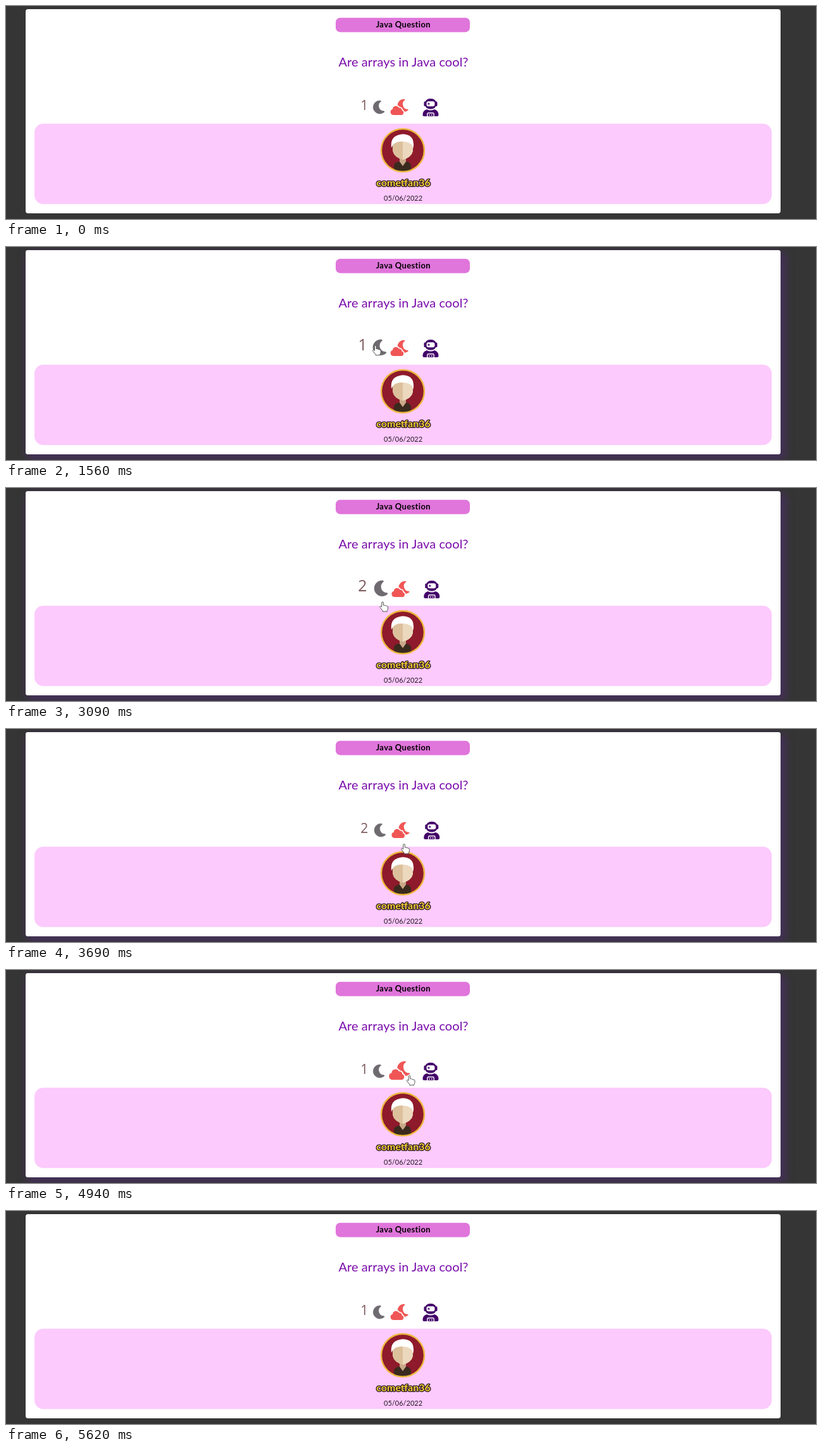
Recreate the animation shown at these times as an HTML page. Size 1280 by 338 pixels, loop 6.35 s.

```html
<!DOCTYPE html>
<html lang="en">
<head>
<meta charset="utf-8">
<title>Question card</title>
<style>
  html, body { margin: 0; width: 100%; height: 100%; overflow: hidden; background: #353535; }
  #stage { position: relative; width: 1280px; height: 338px; overflow: hidden; }
  .card { position: absolute; left: 31px; top: 5px; width: 1193px; height: 324px; border-radius: 4px; background: #fff; }
  #glow { box-shadow: 5px 6px 14px 3px rgba(80, 45, 115, .6); }
  svg { position: absolute; left: 0; top: 0; }
  text { font-family: Lato, "Open Sans", sans-serif; text-anchor: middle; }
  .bold { font-weight: 700; }
  #count { font: 500 21px "Open Sans", Lato, sans-serif; }
</style>
</head>
<body>
<div id="stage">
  <div class="card" id="glow"></div>
  <div class="card"></div>
  <svg width="1280" height="338" viewBox="0 0 1280 338">
    <defs>
      <path id="crescent" stroke-width=".6" stroke-linejoin="round"
        d="M1.2-10.3A10.4 10.4 0 1 0 7.6 7.4L7 6.3A8.45 8.45 0 0 1 2.4-9.3Z"/>
      <path id="puff" d="M612 173a4.7 4.7 0 0 1-1-9.2a5.3 5.3 0 0 1 10-2.2a4 4 0 0 1 4.6 4a3.8 3.8 0 0 1-1 7.4Z"/>
      <clipPath id="disc"><circle cx="627" cy="229" r="33.5"/></clipPath>
    </defs>

    <rect x="521" y="18.8" width="212" height="22.6" rx="7" fill="#e075db"/>
    <text class="bold" x="627.8" y="34" font-size="13" letter-spacing=".36">Java Question</text>
    <text x="628" y="96" font-size="20" letter-spacing=".08" fill="#7a0cab">Are arrays in Java cool?</text>

    <rect x="45" y="186.7" width="1165" height="127.6" rx="14" fill="#fccafc"/>

    <g clip-path="url(#disc)">
      <circle cx="627" cy="229" r="34" fill="#8e1a2b"/>
      <path d="M613 264V253Q614 248 621 247H633Q639 248 640 253V264Z" fill="#3a2a1e"/>
      <path d="M622 238H632V247L627 254L622 247Z" fill="#c9a888"/>
      <path d="M611 218Q627 206 643 218V230Q641 240 627 244Q613 240 611 230Z" fill="#dcc09c"/>
      <path d="M627 212Q638 213 643 218V230Q641 240 627 244Z" fill="#ecd8bd"/>
      <path d="M609 225Q607 209 619 205Q629 201 638 206Q646 212 643.5 226Q642 218 634 216Q621 213 614 218Q611 220 609 225Z" fill="#fff"/>
    </g>
    <circle cx="627" cy="229" r="34" fill="none" stroke="#ecb93c" stroke-width="2.4"/>

    <text class="bold" x="628" y="286" font-size="16" fill="#f7d234" stroke="#2a1726"
      stroke-width="2.6" stroke-linejoin="round" paint-order="stroke">cometfan36</text>
    <text x="627.6" y="308.6" font-size="11" fill="#241824">05/06/2022</text>

    <g id="vote">
      <text id="count" x="566.3" y="165" fill="#7f595c">1</text>
      <use id="moon" href="#crescent" x="590.4" y="160.5" fill="#6e6a70" stroke="#6e6a70"/>
    </g>
    <g id="cloud" fill="#f05656">
      <use href="#crescent" transform="translate(628.5 157.8) scale(.97)"/>
      <use href="#puff" stroke="#fff" stroke-width="3.2"/>
      <use href="#puff"/>
    </g>
    <g id="astro" fill="#430069">
      <rect x="660.5" y="151.5" width="21" height="7.5" rx="1.5"/>
      <rect x="662" y="147" width="18" height="16.5" rx="8"/>
      <rect x="664.5" y="151.3" width="13" height="8" rx="3.2" fill="#fff"/>
      <path d="M668 152.8l.7 1.7l1.7.7l-1.7.7l-.7 1.7l-.7-1.7l-1.7-.7l1.7-.7Z"/>
      <path d="M658.5 173Q658.5 165.5 665 164Q671 167 677 164Q683.5 165.5 683.5 173Q683.5 175 681.5 175H660.5Q658.5 175 658.5 173Z"/>
      <path d="M665.8 175.2V171.5Q665.8 169.8 667.5 169.8H674.5Q676.2 169.8 676.2 171.5V175.2M669.2 172V174M672.8 172V174"
        fill="none" stroke="#fff" stroke-width="1.4"/>
    </g>

    <circle id="click" r="9.5" fill="#ff0" fill-opacity=".47"/>
    <path id="hand" fill="#fff" stroke="#555" stroke-linejoin="round"
      d="M-1.3 1a1.3 1.3 0 0 1 2.6 0V5q2.2-.6 2.5.6q2-.4 2.4.7q2.2-.2 2.2 1.4V10.5q0 1.8-1.2 3V15H.2V13.8L-3.9 8.6q-1-1.6.6-2q.9-.1 2 1.2Z"/>
  </svg>
</div>
<script>
const LOOP = 6350, FADE = 190;
const $ = id => document.getElementById(id);

// Cursor moves: begin, end, and the point reached
const enter = { x: 1180, y: 322 };
const moves = [
  { from: 670, to: 1080, x: 584, y: 153 },
  { from: 1360, to: 1770, x: 583.5, y: 160.5 },
  { from: 2960, to: 3090, x: 595, y: 181 },
  { from: 3090, to: 3550, x: 622, y: 196 },
  { from: 3630, to: 3690, x: 629, y: 183 },
  { from: 3690, to: 3950, x: 627.5, y: 153.5 },
  { from: 4810, to: 4940, x: 636.5, y: 167.5 },
  { from: 4940, to: 5480, x: 1218, y: 326 }
];

const clamp = p => Math.min(1, Math.max(0, p));
const ease = p => p * p * (3 - 2 * p);
const within = (t, from, to) => t >= from && t < to;

// Fades in when the cursor arrives, out when it leaves
const hover = (t, on, off) => ease(clamp((t - on) / FADE)) - ease(clamp((t - off) / FADE));

function cursor(t) {
  return moves.reduce((at, m) => {
    const p = clamp((t - m.from) / (m.to - m.from));
    return { x: at.x + (m.x - at.x) * p, y: at.y + (m.y - at.y) * p };
  }, enter);
}

const show = (el, on) => el.setAttribute('visibility', on ? 'visible' : 'hidden');
const move = (el, x, y) => el.setAttribute('transform', `translate(${x} ${y})`);
const grow = (el, s, x, y, dx = 0) =>
  el.setAttribute('transform', `translate(${x + dx} ${y}) scale(${s}) translate(${-x} ${-y})`);

function draw(t) {
  const two = within(t, 2760, 4610);
  const shift = two ? 1.8 : 0;
  $('count').textContent = two ? '2' : '1';
  move($('moon'), shift, 0);
  move($('astro'), shift, 0);

  const cloud = hover(t, 960, 1040) + hover(t, 3760, 4940);
  grow($('vote'), 1 + .18 * hover(t, 1045, 3090), 582, 168);
  grow($('cloud'), 1 + .17 * cloud, 621.5, 166, shift);
  $('glow').style.opacity = hover(t, 1020, 5430);

  const { x, y } = cursor(t);
  move($('hand'), x, y);
  move($('click'), x, y);
  show($('hand'), within(t, 670, 5550));
  show($('click'), within(t, 2100, 2170) || within(t, 4210, 4350));
}

function tick() {
  draw(performance.now() % LOOP);
  requestAnimationFrame(tick);
}
tick();
</script>
</body>
</html>
```
